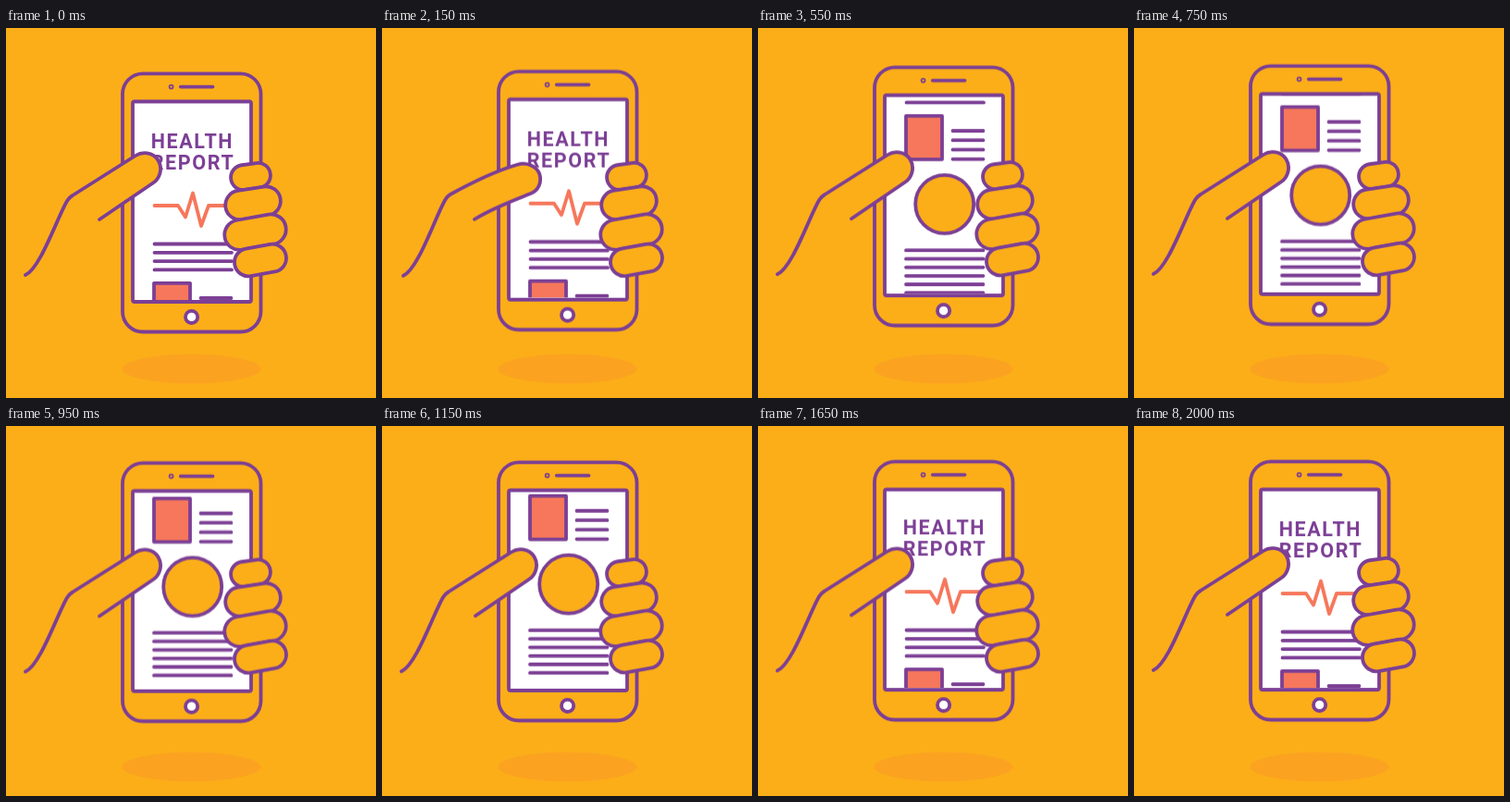
An HTML page for the animation above (2.05 s loop, 400x400 px).

```html
<!DOCTYPE html>
<html lang="en">
<head>
<meta charset="utf-8">
<title>Health report</title>
<style>
  :root { --bg: #fcae18; --ink: #7c3f95; --red: #f6775b; --loop: 2050ms; }
  html, body { margin: 0; width: 100%; height: 100%; overflow: hidden; background: var(--bg); }
  svg { display: block; width: 100vw; height: 100vh; }

  .line { fill: none; stroke: var(--ink); stroke-width: 3.8; stroke-linecap: round; stroke-linejoin: round; }
  .solid { fill: var(--bg); }
  .white { fill: #fff; }
  .red { fill: var(--red); }
  .pulse { stroke: var(--red); }
  text { font: 700 21.5px Roboto, "Open Sans", sans-serif; letter-spacing: 1.6px; fill: var(--ink); }

  .phone, .hand, .page, .thumb { animation: var(--loop) linear infinite; }
  .phone { animation-name: rise; }
  .hand { animation-name: drift; }
  .page { animation-name: scroll; }
  .thumb { animation-name: swipe; }

  @keyframes rise {
    0% { transform: translateY(0); animation-timing-function: cubic-bezier(.33, 1, .68, 1); }
    96%, 100% { transform: translateY(-10.9px); }
  }
  @keyframes drift {
    to { transform: translateY(-3.2px); }
  }
  @keyframes scroll {
    0% { transform: translateY(0); }
    7.32% { transform: translateY(0); animation-timing-function: cubic-bezier(.3, 0, .6, .96); }
    26.83% { transform: translateY(-174px); animation-timing-function: cubic-bezier(.33, .5, .6, 1); }
    56.1% { transform: translateY(-190.3px); animation-timing-function: cubic-bezier(.31, 0, .4, 1); }
    80.49% { transform: translateY(-2px); animation-timing-function: ease-out; }
    97.56%, 100% { transform: translateY(0); }
  }
  @keyframes swipe {
    0%, 14.63%, 56.1%, 80.49%, 100% {
      d: path("M21 267 C37 260 55 206 66 187 C68 183.5 69.5 182.5 72 181 C95 166.5 117 152.5 140 138 C147 133.5 159 134 164.5 143 C170 152 166 163 159 167.5 C140 180.5 120 194 101 207");
      animation-timing-function: ease-in-out;
    }
    7.32%, 68.29% {
      d: path("M23 268 C39 261 57 206 68 186.5 C70 183 71 181.5 74 180 C94 169 120 155.5 146 148 C156 145 167 149 170.3 158 C173 167 169 176 161 179 C141 187 119 195 100 207");
      animation-timing-function: ease-in-out;
    }
  }
</style>
</head>
<body>
<svg viewBox="0 0 400 400">
  <defs>
    <clipPath id="screen"><rect x="138" y="80.5" width="126" height="213"/></clipPath>
  </defs>

  <ellipse cx="200.5" cy="368.5" rx="75" ry="16" fill="#fba320"/>

  <g class="phone">
    <rect class="line solid" x="126" y="49.3" width="149.5" height="279.2" rx="22"/>
    <rect class="white" x="137" y="79.5" width="128" height="216.5" rx="2"/>
    <g clip-path="url(#screen)">
      <g class="page">
        <text x="156.8" y="129.6">HEALTH</text>
        <text x="156.8" y="153.4">REPORT</text>
        <path class="line pulse" d="M160.5 192 H186 L194 204.5 L202 178.5 L211 214 L219 192 H243.5"/>
        <path class="line" d="M160.5 233.5 h83.5 m-83.5 9.3 h83.5 m-83.5 9.3 h83.5 m-83.5 9.3 h83.5"/>
        <rect class="line red" x="160" y="275.8" width="39" height="47"/>
        <path class="line" d="M210.5 292 h33 m-33 10.2 h33 m-33 10.2 h33 m-33 10.2 h33"/>
        <circle class="line solid" cx="201.7" cy="371.3" r="31.5"/>
        <path class="line" d="M160 421.2 h83.5 m-83.5 9.2 h83.5 m-83.5 9.2 h83.5 m-83.5 9.2 h83.5 m-83.5 9.2 h83.5 m-83.5 9.2 h83.5"/>
      </g>
    </g>
    <rect class="line" x="137" y="79.5" width="128" height="216.5" rx="2"/>
    <circle class="line" cx="178.6" cy="63.6" r="2" style="stroke-width:1.7"/>
    <path class="line" d="M188.8 63.6 H223.5"/>
    <circle class="line white" cx="200.6" cy="312.4" r="6.6"/>
  </g>

  <g class="hand">
    <path class="line solid thumb" d="M21 267"/>
    <g class="line solid">
      <rect class="solid" x="-21.5" y="-13.5" width="43" height="27" rx="13.5" transform="translate(264.5 160.5) rotate(-8)"/>
      <rect class="solid" x="-30" y="-15.75" width="60" height="31.5" rx="15.75" transform="translate(267 189.3) rotate(-9)"/>
      <rect class="solid" x="-33.5" y="-16.2" width="67" height="32.4" rx="16.2" transform="translate(269.5 220.7) rotate(-10)"/>
      <rect class="solid" x="-28.2" y="-15" width="56.4" height="30" rx="15" transform="translate(275 251) rotate(-10)"/>
    </g>
  </g>
</svg>
</body>
</html>
```
